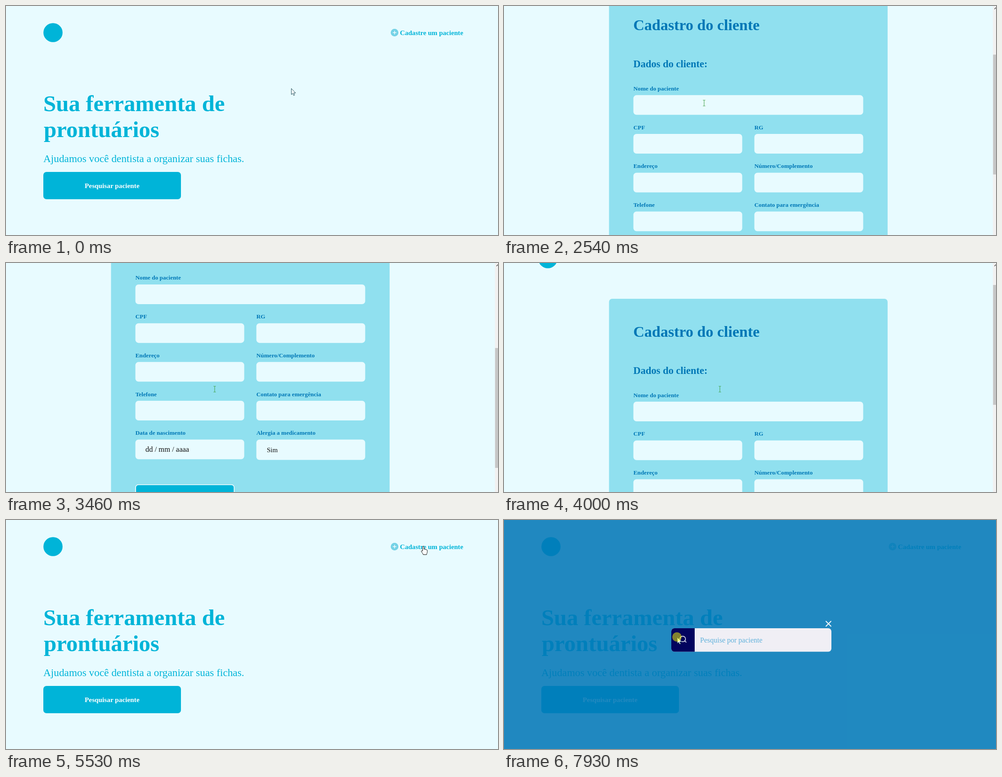
Write an HTML page that moves like this. It is 1094 px wide and 512 px high and loops after 8000 ms.

```html
<!DOCTYPE html>
<html lang="pt-BR">
<head>
<meta charset="utf-8">
<title>Prontuários</title>
<style>
  html, body { margin: 0; width: 100%; height: 100%; overflow: hidden; background: #e8fbff; }
  svg { display: block; width: 1094px; height: 512px; font-family: "Liberation Serif", serif; }
  .bold { font-weight: bold; }
  .cyan { fill: #00b4d8; }
  .blue { fill: #0077b6; }
  .pale { fill: #e8fbff; }
  .line { fill: none; stroke: #fff; stroke-linecap: round; stroke-linejoin: round; }
</style>
</head>
<body>
<svg viewBox="0 0 1094 512">
  <rect class="pale" width="1094" height="512"/>

  <g id="home" class="cyan">
    <circle cx="104.5" cy="59.5" r="21.3"/>
    <circle cx="864" cy="59.5" r="8.5" fill="#74d2e6"/>
    <path class="line" d="M860.5 59.5h7M864 56v7" stroke-width="1.4"/>
    <g class="bold">
      <text x="876" y="64.5" font-size="15.1">Cadastre um paciente</text>
      <text x="83" y="234.5" font-size="50.8">Sua ferramenta de</text>
      <text x="84" y="292.5" font-size="51">prontuários</text>
    </g>
    <text x="83" y="349" font-size="23.3">Ajudamos você dentista a organizar suas fichas.</text>
    <rect x="83" y="371" width="306" height="61" rx="7"/>
    <text class="bold" x="175" y="407" font-size="15.3" fill="#fff">Pesquisar paciente</text>
  </g>

  <g id="form">
    <g id="page">
      <circle class="cyan" cx="97.5" cy="59.5" r="21.3"/>
      <circle cx="882.5" cy="59.5" r="8.6" fill="#74d2e6"/>
      <path class="cyan" d="M882.5 50.9a8.6 8.6 0 0 0 0 17.2z"/>
      <path d="M876 59.5l6-5.5v3.5h5.5v4h-5.5v3.5z" fill="#fff"/>
      <text class="cyan bold" x="898" y="64.5" font-size="15">Voltar para home</text>
      <rect x="233.5" y="149" width="619.5" height="777" rx="7" fill="#90e0ef"/>
      <g class="blue bold">
        <text x="287.5" y="233.5" font-size="34">Cadastro do cliente</text>
        <text x="287.5" y="317" font-size="22.5">Dados do cliente:</text>
      </g>
      <g id="fields"></g>
      <text x="310" y="753" font-size="16.5" fill="#111">dd / mm / aaaa</text>
      <text x="580" y="754" font-size="15" fill="#111">Sim</text>
      <rect class="cyan" x="288.3" y="826.8" width="219" height="44" rx="6" stroke="#fff" stroke-width="1.6"/>
      <text class="bold" x="336" y="854" font-size="15.1" fill="#fff">Cadastrar paciente</text>
    </g>
    <rect x="1087" width="7" height="512" fill="#f1f1f1"/>
    <path d="M1090.5 7l3.5-3.5" fill="none" stroke="#505050" stroke-width="1.5"/>
    <rect id="thumb" x="1087.5" y="12" width="7" height="268" fill="#c6c6c6"/>
  </g>

  <g id="modal">
    <rect width="1094" height="512" fill="#0077b6" fill-opacity=".862"/>
    <path class="line" d="M716 226.5l11 11m0-11l-11 11" stroke-width="1.8"/>
    <rect x="372" y="242" width="356" height="52.5" rx="7" fill="#f0eff5"/>
    <path id="search" d="M424 242h-45a7 7 0 0 0-7 7v38.500a7 7 0 0 0 7 7h45z"/>
    <path class="line" d="M391 266a6.300 6.300 0 1 0 12.600 0a6.300 6.300 0 1 0-12.600 0M402 270.500l3 2.800" stroke-width="1.5"/>
    <text x="436" y="273.500" font-size="16" fill="#5fb1db">Pesquise por paciente</text>
  </g>

  <g id="cursor">
    <path id="arrow" d="M.5.5v13.500l3-2.800 2.200 4.800 2.200-1-2.200-4.600h4.200z" fill="#fff" stroke="#0b3c49" stroke-width=".9"/>
    <path id="hand" d="M-1.500 11V1.500a1.500 1.500 0 0 1 3 0V7c.5-1.200 2.300-1 2.500.5 .7-1 2.200-.7 2.500.8 .8-.8 2.200-.2 2.200 1.200V13c0 2-1.200 3-1.500 6h-7.500c-.2-2.500-3-4.500-4.200-7.500-.4-1.300 1-2.100 1.900-1.200z" fill="#fff" stroke="#111"/>
    <path id="beam" d="M-2.500-6.500h2l.5.5.5-.5h2M0-6V6M-2.500 6.500h2l.5-.5.5.5h2" fill="none" stroke="#3f9f45"/>
    <circle id="click" r="10.5" cx="-.5" cy="-.5" fill="#ff0" fill-opacity=".5"/>
  </g>
</svg>
<script>
  const LOOP = 8000, STEP = 76.6;
  const $ = id => document.getElementById(id);

  const rows = [
    ['Nome do paciente'],
    ['CPF', 'RG'],
    ['Endereço', 'Número/Complemento'],
    ['Telefone', 'Contato para emergência'],
    ['Data de nascimento', 'Alergia a medicamento']
  ];
  $('fields').innerHTML = rows.map((row, r) => row.map((label, c) => {
    const x = 287.7 + c * 269, y = r * 86.7;
    const width = row.length > 1 ? 242 : 511;
    return `<text class="blue bold" x="${x}" y="${368.5 + y}" font-size="13.3">${label}</text>
      <rect class="pale" x="${x}" y="${379 + y}" width="${width}" height="${r === 4 && c ? 45.5 : 44}" rx="7"/>`;
  }).join('')).join('');

  // [time, x, y]
  const path = [
    [310, 634, 184], [850, 922, 58], [1930, 922, 58], [2370, 445, 217],
    [2920, 445, 217], [3140, 443, 252], [3220, 443, 252], [3440, 464, 282],
    [3600, 464, 282], [3760, 480, 282], [4070, 480, 282], [4680, 928, 58.5],
    [5640, 928, 58.5], [6460, 322, 365], [6580, 306, 388], [6900, 306, 388],
    [7290, 385, 262]
  ];
  // [time, scroll offset]
  const scroll = [
    [2370, 0], [2450, 55], [2530, 176], [2680, 264], [2920, 352], [3080, 436],
    [3360, 436], [3600, 172], [3830, 172], [3905, 105], [3980, 78], [4080, 0]
  ];
  const shapes = [
    [0, 'arrow'], [800, 'hand'], [2000, 'arrow'], [2350, 'beam'], [3060, 'arrow'],
    [3380, 'beam'], [4150, 'arrow'], [4650, 'hand'], [5760, 'arrow'], [6530, 'hand'],
    [6850, 'arrow']
  ];
  const clicks = [[920, 1150], [5000, 5230], [6620, 6780], [7930, 8000]];

  const within = (t, a, b) => t >= a && t < b;
  const show = (id, on) => $(id).setAttribute('display', on ? 'inline' : 'none');

  function sample(keys, t) {
    const next = keys.findIndex(k => k[0] > t);
    if (next === 0) return keys[0].slice(1);
    if (next < 0) return keys[keys.length - 1].slice(1);
    const a = keys[next - 1], b = keys[next];
    const p = (t - a[0]) / (b[0] - a[0]);
    return a.slice(1).map((v, i) => v + (b[i + 1] - v) * p);
  }

  function render(t) {
    const tick = 2000 + Math.floor((t - 2000) / STEP) * STEP;
    const onForm = within(t, 1680, 5530);
    const [offset] = sample(scroll, tick);
    const [x, y] = sample(path, tick);
    const shape = shapes.filter(s => s[0] <= t).pop()[1];
    const hover = Math.min(1, Math.max(0, (tick - 7290) / 300));

    show('home', !onForm);
    show('form', onForm);
    show('modal', t >= 6850);
    $('page').setAttribute('transform', `translate(0 ${-offset})`);
    $('thumb').setAttribute('y', 12 + offset * 0.538);
    $('search').setAttribute('fill', `rgb(${3 * hover}, ${119 - 115 * hover}, ${182 - 88 * hover})`);
    $('cursor').setAttribute('transform', `translate(${x} ${y})`);
    for (const id of ['arrow', 'hand', 'beam']) show(id, id === shape);
    show('click', clicks.some(([a, b]) => within(t, a, b)));
  }

  const start = performance.now();
  function frame() {
    render((performance.now() - start) % LOOP);
    requestAnimationFrame(frame);
  }
  frame();
</script>
</body>
</html>
```
